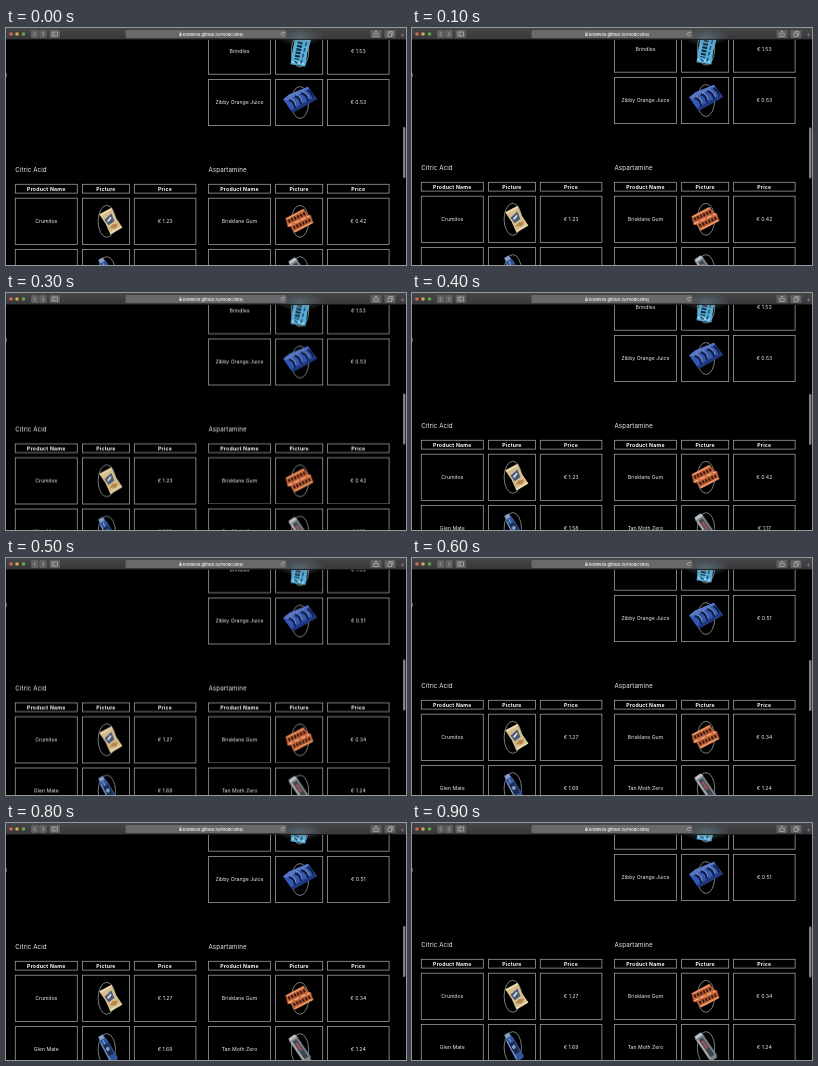
These frames come from a looping animation (400x237 px, 1000 ms). An HTML page:

```html
<!DOCTYPE html>
<html lang="en">
<head>
<meta charset="utf-8">
<title>Price list</title>
<style>
html, body { margin: 0; width: 100%; height: 100%; overflow: hidden; background: #000; }
svg { display: block; width: 100vw; height: 100vh; }
text { font-family: Inter, "Open Sans", sans-serif; fill: #eee; font-size: 5.2px; }
.mid { text-anchor: middle; }
.title { font-size: 6.2px; letter-spacing: .1px; }
.head { font-size: 5.2px; font-weight: 700; letter-spacing: .2px; fill: #fff; }
.url { font-size: 4.1px; fill: #eee; font-weight: 600; }
.box { fill: none; stroke: #9c9c9c; stroke-width: .8; }
.ring { fill: none; stroke: #929a96; stroke-width: .8; }
.icon { fill: none; stroke: #c4c4c4; stroke-width: .6; }
#page { animation: scroll 1s step-end infinite; }
#thumb { animation: thumb 1s steps(10) infinite; }
.old { animation: hide 1s step-end infinite; }
.new { animation: show 1s step-end infinite; }
@keyframes scroll {
  0% { transform: translateY(0); }
  10% { transform: translateY(-2px); }
  20% { transform: translateY(-4px); }
  30% { transform: translateY(-5.5px); }
  40% { transform: translateY(-9px); }
  50% { transform: translateY(-11.5px); }
  60% { transform: translateY(-14px); }
  70% { transform: translateY(-16px); }
  80% { transform: translateY(-18px); }
  90%, 100% { transform: translateY(-20px); }
}
@keyframes thumb { to { transform: translateY(5px); } }
@keyframes hide { 0% { opacity: 1; } 50%, 100% { opacity: 0; } }
@keyframes show { 0% { opacity: 0; } 50%, 100% { opacity: 1; } }
</style>
</head>
<body>
<svg viewBox="0 0 400 237" preserveAspectRatio="none">
  <defs>
    <linearGradient id="chrome" x2="0" y2="1">
      <stop offset="0" stop-color="#464648"/><stop offset="1" stop-color="#38383a"/>
    </linearGradient>
    <radialGradient id="glow">
      <stop offset="0" stop-color="#68818e" stop-opacity=".6"/><stop offset="1" stop-color="#68818e" stop-opacity="0"/>
    </radialGradient>
    <g id="candy" transform="translate(.5 0) rotate(12)">
      <path d="M-8-15 8-14 7 0 8 14-7 15-8 2Z" fill="#58b0da"/>
      <path d="M-7-13H6M-6 12H6" stroke="#a9dcf0" stroke-width="1.6"/>
      <path d="M-2-9v18" stroke="#14283c" stroke-width="5" stroke-dasharray="2.2 1.2"/>
      <path d="M4-10 3 12M-4 11 1 13" stroke="#1d4d70" stroke-width="1.5" stroke-dasharray="4 2"/>
    </g>
    <g id="juice" transform="translate(.5 -3.5) rotate(-25)">
      <path d="M-16-7-8-9 12-8 15 7 4 8-13 9Z" fill="#3257b4"/>
      <path d="M-16-7-8-9 12-8 12-6-13-4Z" fill="#5876c2"/>
      <path d="M-13 9 4 8 15 7 14 4-13 6Z" fill="#20377c"/>
      <path d="M-11-4q5 4 2 10M-4-5q5 4 2 10M3-5q5 4 3 10M10-5q3 4 2 9" fill="none" stroke="#101d45" stroke-width="2"/>
      <path d="M-9-5q4 4 2 9M-2-6q4 4 2 9M5-6q4 4 3 9" fill="none" stroke="#8b98a4" stroke-width=".9"/>
    </g>
    <g id="chips" transform="translate(4 -.5) rotate(-29)">
      <path d="M-7-11.5 7-11 6 0 7 11.5-7 12-6 0Z" fill="#d6bd8c"/>
      <path d="M-6.5-10H6.5M-6.5 10.5H6.5" stroke="#ecdcb6" stroke-width="1.6"/>
      <path d="M-5-4 4-6 3 2-4 3Z" fill="#475a80"/>
      <path d="M-3-1 2-3" stroke="#eee3c4" stroke-width="1.6"/>
      <path d="M-5 6 0 4 5 6 1 9Z" fill="#b7854a"/>
    </g>
    <g id="gum" transform="translate(-1 -.5) rotate(-25)">
      <path d="M-11-8 9-9 11-1 13 0 12 8-9 9-10 2-13 1Z" fill="#cf6538"/>
      <path d="M-11-7 9-8M-9 8 12 7" stroke="#eda06f" stroke-width="1.4"/>
      <path d="M-10-4H9M-8 4H11" stroke="#2c1710" stroke-width="3.4" stroke-dasharray="2 1.3"/>
      <path d="M-12 0H12" stroke="#ecc5a0" stroke-width="1.1" stroke-dasharray="5 2"/>
    </g>
    <g id="bottle" transform="translate(1 -.7) rotate(-29)">
      <path d="M-2.5-15H2.5L4-8 4.5 13Q0 16-4.5 13L-4-8Z" fill="#31559a"/>
      <path d="M-2.5-15H2.5V-11H-2.5Z" fill="#8ba0c0"/>
      <path d="M-3-5H3V7H-3Z" fill="#1b2c4c"/>
      <circle cy="0" r="2" fill="#7d9cc8"/>
      <path d="M-3.3-9V12M0-10V-6" stroke="#8aa4cd" stroke-width="1"/>
    </g>
    <g id="can" transform="translate(0 -.7) rotate(-34)">
      <path d="M-3.5-15H3.5L4.5-12V12L3 15H-3L-4.5 12V-12Z" fill="#7c858b"/>
      <path d="M-3.5-15H3.5L4.5-12H-4.5Z" fill="#c0c4c8"/>
      <path d="M-2-10H2.5V11H-2Z" fill="#39444e"/>
      <path d="M.3-7V2" stroke="#a8545a" stroke-width="2.4"/>
      <path d="M-3.3-11V12" stroke="#c9bdc0" stroke-width="1.2"/>
    </g>
  </defs>
  <rect width="400" height="237"/>
  <g id="page"></g>
  <path d="M.5 45V49" stroke="#555"/>
  <rect id="thumb" x="397" y="99" width="2.4" height="51" rx="1.2" fill="#828282"/>
  <g id="bar">
    <rect width="400" height="11.5" fill="url(#chrome)"/>
    <ellipse cx="294" cy="9" rx="24" ry="9" fill="url(#glow)"/>
    <path d="M0 11.5H400" stroke="#161616" stroke-width=".8"/>
    <circle cx="5" cy="6" r="1.8" fill="#d9655d"/>
    <circle cx="11" cy="6" r="1.8" fill="#d0ab4c"/>
    <circle cx="17.5" cy="6" r="1.8" fill="#5aa850"/>
    <g fill="#606062">
      <rect x="25" y="2" width="7.5" height="8" rx="1.3"/>
      <rect x="33.2" y="2" width="7.5" height="8" rx="1.3"/>
      <rect x="43.5" y="2" width="10.5" height="8" rx="1.3"/>
      <rect x="119.5" y="2" width="161" height="8" rx="1.5" fill="#69696b"/>
      <rect x="364.5" y="2" width="11" height="8" rx="1.3"/>
      <rect x="378.5" y="2" width="11" height="8" rx="1.3"/>
    </g>
    <path class="icon" d="M29.5 4 27.7 6 29.5 8M36.3 4 38.1 6 36.3 8M46 4h5.5v4H46ZM48 4v4
      M369 5.2h-1.3v3.3h4.6V5.2H371M370 7V3M368.8 4.1 370 3 371.2 4.1
      M382 5h3.6v3.5H382ZM383.2 5V3.5h3.6V7h-1.2"/>
    <path class="icon" d="M394.5 7h4M396.5 5v4" opacity=".5"/>
    <path class="icon" d="M278 5a1.6 1.6 0 1 0 .2 1.7M278.3 3.7V5.2h-1.5"/>
    <path d="M173.3 5.6h2.4v2.2h-2.4Z" fill="#ddd"/>
    <path class="icon" d="M173.8 5.6V4.8a.7.7 0 0 1 1.4 0v.8"/>
    <text class="url" x="177" y="7.5">bramvos.github.io/FoodCoins/</text>
  </g>
</svg>
<script>
const COLS = [[9.3, 62], [76.4, 47.1], [128.3, 61.6]];
const ROW_H = 46.2, HEAD_H = 8.8;
const mids = COLS.map(([x, w]) => x + w / 2);

const boxes = (y, h) => COLS.map(([x, w]) =>
  `<rect class="box" x="${x}" y="${y}" width="${w}" height="${h}"/>`).join('');
const label = (x, y, s, cls = '') => `<text class="mid ${cls}" x="${x}" y="${y}">${s}</text>`;

function row(y, name, pic, before, after) {
  const c = y + ROW_H / 2, base = c + 1.7;
  const price = before === after
    ? label(mids[2], base, '€ ' + before)
    : label(mids[2], base, '€ ' + before, 'old') + label(mids[2], base, '€ ' + after, 'new');
  return boxes(y, ROW_H) + label(mids[0], base, name) +
    `<ellipse class="ring" cx="100.8" cy="${c}" rx="8.7" ry="16"/>` +
    `<use href="#${pic}" x="100.8" y="${c}"/>` + price;
}

function heading(title) {
  const heads = ['Product Name', 'Picture', 'Price'];
  return `<text class="title" x="9.3" y="144.1">${title}</text>` + boxes(156.3, HEAD_H) +
    heads.map((s, i) => label(mids[i], 162.6, s, 'head')).join('');
}

const left = heading('Citric Acid') +
  row(170.2, 'Crumitos', 'chips', '1.23', '1.27') +
  row(221.5, 'Glen Mate', 'bottle', '1.58', '1.69');
const right = row(0, 'Brindles', 'candy', '1.53', '1.53') +
  row(51.4, 'Zibby Orange Juice', 'juice', '0.53', '0.51') +
  heading('Aspartamine') +
  row(170.2, 'Brisklane Gum', 'gum', '0.42', '0.34') +
  row(221.5, 'Tan Moth Zero', 'can', '1.17', '1.24');

document.getElementById('page').innerHTML =
  `<g>${left}</g><g transform="translate(193.2 0)">${right}</g>`;
</script>
</body>
</html>
```
